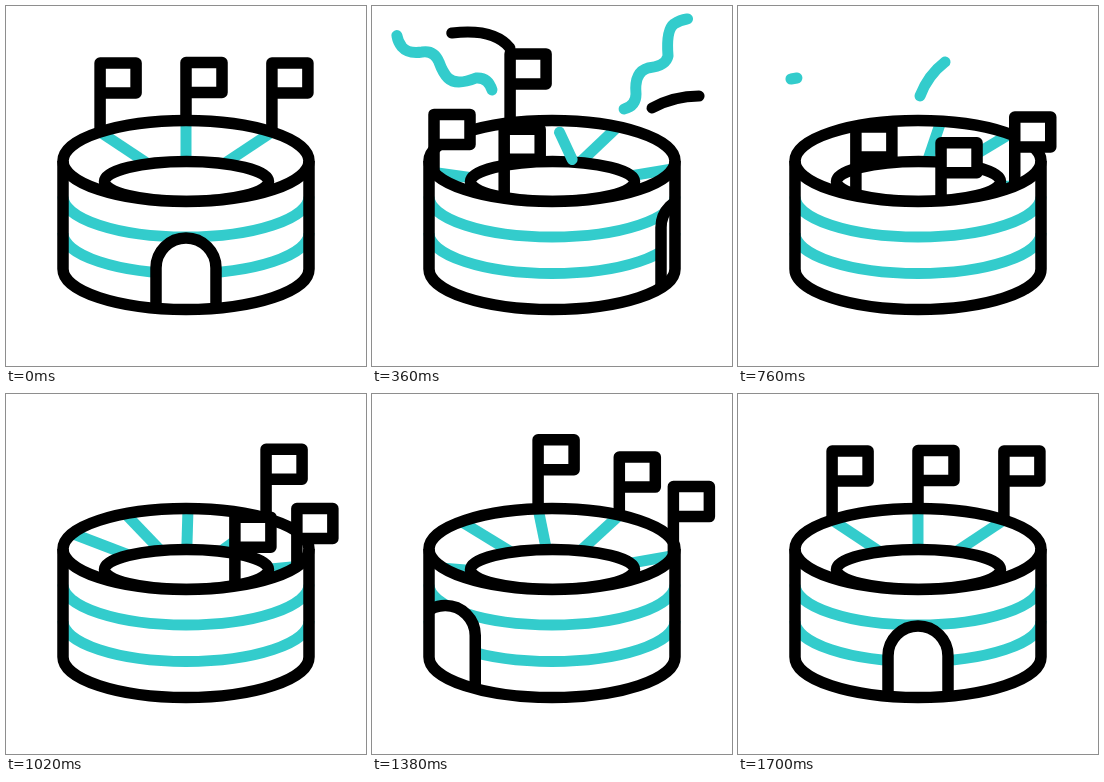
Write an HTML page that moves like this. It is 360 by 360 pixels and loops after 2400 ms.

```html
<!DOCTYPE html>
<html lang="en">
<head>
<meta charset="utf-8">
<title>Stadium</title>
<style>
  html, body { margin: 0; width: 100%; height: 100%; overflow: hidden; background: #fff; }
  svg { display: block; width: 100vw; height: 100vh; fill: none; stroke: #000; stroke-width: 11.5; stroke-linejoin: round; }
  .teal { stroke: #33cccc; stroke-width: 11; }
  .white { fill: #fff; }
  #streamers { stroke-linecap: round; stroke-width: 11; }
</style>
</head>
<body>
<svg id="stage" viewBox="0 0 360 360">
  <clipPath id="wallClip"><path d="M57 155V263A123 40.5 0 0 0 303 263V155A123 40.5 0 0 1 57 155Z"/></clipPath>
  <g id="streamers"></g>
  <path class="white" stroke="none" d="M57 155V263A123 40.5 0 0 0 303 263V155A123 40.5 0 0 0 57 155Z"/>
  <g id="spokes" class="teal"></g>
  <ellipse class="white" cx="180.500" cy="175.500" rx="82" ry="20"/>
  <path class="white" stroke="none" d="M57 155V263A123 40.5 0 0 0 303 263V155A123 40.5 0 0 1 57 155Z"/>
  <g class="teal">
    <path d="M57 190.500A123 40.500 0 0 0 303 190.500"/>
    <path d="M57 227A123 40.500 0 0 0 303 227"/>
  </g>
  <g clip-path="url(#wallClip)">
    <path id="door" class="white" d="M-30 60V0A30 30 0 0 1 30 0V60"/>
  </g>
  <ellipse cx="180" cy="155" rx="123" ry="40.5"/>
  <path d="M57 155V263A123 40.5 0 0 0 303 263V155"/>
  <g id="loose" class="teal" stroke-linecap="round"></g>
  <g id="flags"></g>
</svg>
<script>
const LOOP = 2400, MOVE = 1700;
const CX = 180, CY = 155, RX = 123, RY = 40.5;
const $ = id => document.getElementById(id);

function add(parent, tag, attrs) {
  const el = document.createElementNS("http://www.w3.org/2000/svg", tag);
  for (const k in attrs) el.setAttribute(k, attrs[k]);
  parent.appendChild(el);
  return el;
}

// Cumulative arc length of the rim, one entry per degree, from the back.
const arc = [0];
for (let d = 1; d <= 360; d++) {
  const a = (d - 0.5) * Math.PI / 180;
  arc.push(arc[d - 1] + Math.hypot(RX * Math.cos(a), RY * Math.sin(a)) * Math.PI / 180);
}
const ROUND = arc[360];

function rim(s) {
  s = ((s % ROUND) + ROUND) % ROUND;
  let d = 1;
  while (d < 360 && arc[d] < s) d++;
  const a = (d - 1 + (s - arc[d - 1]) / (arc[d] - arc[d - 1])) * Math.PI / 180;
  return { x: CX + RX * Math.sin(a), y: CY - RY * Math.cos(a) };
}

function segment(keys, t) {
  let i = 0;
  while (i < keys.length - 2 && t > keys[i + 1][0]) i++;
  return i;
}

const slope = (a, b) => (b[1] - a[1]) / (b[0] - a[0]);

function linear(keys, t) {
  const i = segment(keys, t), a = keys[i], b = keys[i + 1];
  const u = Math.min(1, Math.max(0, (t - a[0]) / (b[0] - a[0])));
  return a[1] + u * (b[1] - a[1]);
}

// Hermite curve through the keys
function smooth(keys, t) {
  const i = segment(keys, t), a = keys[i], b = keys[i + 1];
  const span = b[0] - a[0];
  const u = Math.min(1, Math.max(0, (t - a[0]) / span));
  const ma = slope(keys[i - 1] || a, b) * span;
  const mb = slope(a, keys[i + 2] || b) * span;
  const u2 = u * u, u3 = u2 * u;
  return (2 * u3 - 3 * u2 + 1) * a[1] + (u3 - 2 * u2 + u) * ma
    + (3 * u2 - 2 * u3) * b[1] + (u3 - u2) * mb;
}

const STOPS = [0, 360, 760, 1020, 1240, 1500, MOVE];
const flags = [
  { start: -87, pole: 69, run: [0, 138.5, 285, 379, 437, 504, ROUND] },
  { start: 0, pole: 58, run: [0, 149.5, 296.5, 388, 446, 506, ROUND] },
  { start: 87, pole: 69, run: [0, 129, 298, 409.5, 457, 517, ROUND] }
].map(f => ({
  ...f,
  keys: STOPS.map((t, i) => [t, f.start - f.run[i]]),
  el: add($("flags"), "path", { d: `M0 0V${-f.pole}H36V${30 - f.pole}H0`, class: "white" }),
  spoke: add($("spokes"), "line", {})
}));

const seams = [
  [[0, 210], [360, 66], [760, -62], [1020, -118], [1240, -205]],
  [[0, 270], [360, 145], [760, 23], [1020, -61], [1240, -115], [1500, -205]],
  [[360, 215], [760, 93], [1020, 2], [1240, -66], [1500, -118], [MOVE, -205]]
].map(keys => ({ keys, el: add($("spokes"), "line", {}) }));

const loose = { keys: [[0, 205], [360, 2], [760, -140]], el: add($("loose"), "line", {}) };

function setLine(el, x1, y1, x2, y2) {
  el.setAttribute("x1", x1);
  el.setAttribute("y1", y1);
  el.setAttribute("x2", x2);
  el.setAttribute("y2", y2);
}

const toCentre = (el, p) => setLine(el, p.x, p.y, CX, 183);

// Streamers: lead-in, the stretch shown at time `at`, and run-out.
// Head moves from t0 to t2, the end follows from t1 to t3.
const streamers = [
  { at: 360, t: [60, 150, 460, 640], color: "#000",
    d: ["M150 110Q152 62 138 42", "Q122 22 80 27", "Q62 30 50 38"] },
  { at: 360, t: [100, 180, 400, 600], color: "#000",
    d: ["M236 150Q252 118 280 102", "Q302 90 327 90", "Q329 90 331 91"] },
  { at: 360, t: [60, 200, 420, 680], color: "#33cccc",
    d: ["M150 112Q140 96 120 84", "Q116 71 104 72Q84 80 76 72Q71 67 67 56Q62 44 50 46Q36 48 30 41Q26 36 25 30", "Q22 22 18 18"] },
  { at: 360, t: [60, 200, 420, 680], color: "#33cccc",
    d: ["M226 130Q238 108 252 103", "Q264 100 264 88Q262 66 276 62Q294 60 296 50Q294 24 302 18Q308 14 315 13", "Q322 12 326 7"] },
  { at: 760, t: [480, 580, 775, 785], color: "#33cccc",
    d: ["M120 112Q98 72 59 72", "L53 73", "L52 73"] },
  { at: 760, t: [600, 650, 840, 900], color: "#33cccc",
    d: ["M172 130Q176 106 182 90", "Q190 69 207 56", "Q222 44 240 42"] }
].map(({ at, t, color, d }) => {
  const el = add($("streamers"), "path", { stroke: color });
  const [lead, shown, total] = d.map((_, i) => {
    el.setAttribute("d", d.slice(0, i + 1).join(""));
    return el.getTotalLength();
  });
  return {
    el, t,
    head: [[t[0], 0], [at, shown], [t[2], total]],
    end: [[t[1], 0], [at, lead], [t[3], total]]
  };
});

const doorOut = [[0, 180], [360, 319], [480, 365]];
const doorIn = [[1180, -4], [1240, 20], [1500, 117], [MOVE, 180]];

function draw(t) {
  const order = [];
  for (const f of flags) {
    const p = rim(smooth(f.keys, t));
    f.el.setAttribute("transform", `translate(${p.x} ${p.y})`);
    toCentre(f.spoke, p);
    order.push([p.y, f.el]);
  }
  order.sort((a, b) => a[0] - b[0]).forEach(o => $("flags").appendChild(o[1]));

  for (const s of seams) toCentre(s.el, rim(smooth(s.keys, t)));

  const pos = smooth(loose.keys, t), p = rim(pos);
  const dx = 214 - p.x, dy = 183 - p.y, len = Math.hypot(dx, dy);
  const along = n => [p.x + dx * n / len, p.y + dy * n / len];
  setLine(loose.el, ...along(13), ...along(43));
  loose.el.style.display = Math.abs(pos) < 120 ? "" : "none";

  const x = smooth(t < 800 ? doorOut : doorIn, t);
  const k = Math.min(1, Math.abs(x - CX) / RX);
  const y = 262 - RY * (1 - Math.sqrt(1 - k * k));
  $("door").setAttribute("transform", `translate(${x} ${y})`);

  for (const s of streamers) {
    const a = linear(s.end, t), b = linear(s.head, t);
    const on = t > s.t[0] && t < s.t[3] && b > a;
    s.el.style.display = on ? "" : "none";
    s.el.style.strokeDasharray = `${Math.max(0.01, b - a)} 2000`;
    s.el.style.strokeDashoffset = -a;
  }
}

const began = performance.now();
function tick() {
  const t = Math.max(0, performance.now() - began) % LOOP;
  draw(Math.min(MOVE, Math.floor(t / 20) * 20));
  requestAnimationFrame(tick);
}
draw(0);
requestAnimationFrame(tick);
</script>
</body>
</html>
```
